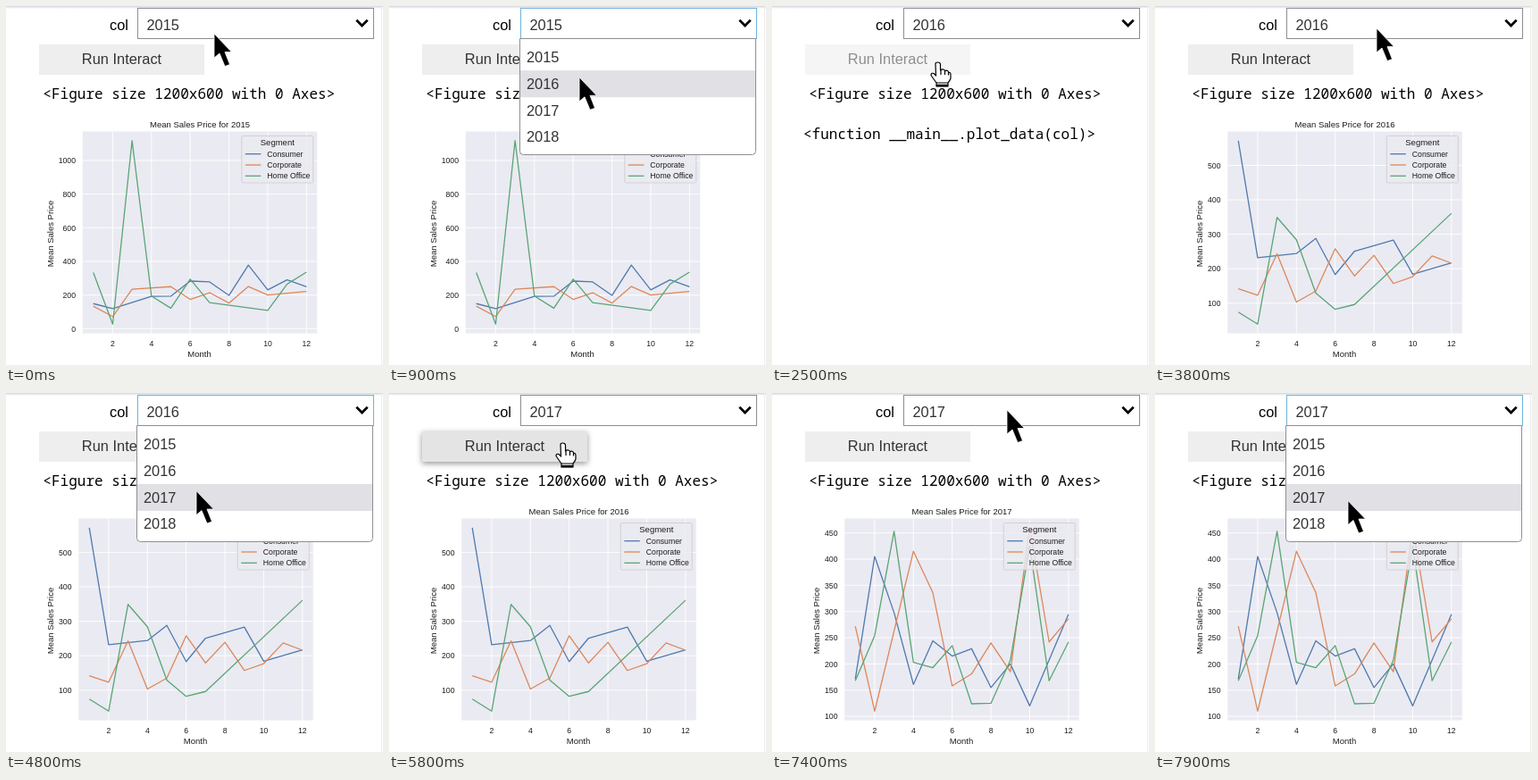
Write an HTML page that moves like this. It is 422 px wide and 402 px high and loops after 8000 ms.

```html
<!DOCTYPE html>
<html lang="en">
<head>
<meta charset="utf-8">
<title>Interactive sales plot</title>
<style>
html, body { margin: 0; width: 100%; height: 100%; overflow: hidden; background: #fff; }
svg { display: block; width: 422px; height: 402px; font-family: "Liberation Sans", Arial, sans-serif; }
.ui { font-size: 16.4px; fill: #333; }
.mono { font: 16.05px "Noto Sans Mono", monospace; fill: #000; white-space: pre; }
.big { font-size: 9.5px; fill: #1c1c1c; }
.small { font-size: 8.7px; fill: #1c1c1c; }
.mid { text-anchor: middle; }
.end { text-anchor: end; }
.line { fill: none; stroke-width: 1.3; stroke-linejoin: round; }
#btn rect { fill: #eee; }
#btn.hover rect { filter: drop-shadow(0 1.5px 1.5px rgba(0,0,0,.32)); }
#btn.active rect { fill: #e4e4e4; filter: drop-shadow(0 2px 3px rgba(0,0,0,.42)); }
#btn.disabled { opacity: .55; }
</style>
</head>
<body>
<svg viewBox="0 0 422 402">
  <defs>
    <linearGradient id="edge" x2="0" y2="1">
      <stop stop-color="#d6d2da"/><stop offset="1" stop-color="#fff"/>
    </linearGradient>
  </defs>
  <rect width="422" height="402" fill="#fff"/>
  <rect width="422" height="3" fill="url(#edge)"/>
  <path d="M420.5 0V402" stroke="#ececec"/>

  <text class="ui" x="116" y="27" style="fill:#000">col</text>
  <rect id="box" x="147.5" y="2.5" width="264" height="34" fill="#fff"/>
  <text class="ui" id="value" x="157.5" y="27"></text>
  <path d="M392.3 15.8L398.5 22L404.7 15.8" fill="none" stroke="#000" stroke-width="2.7"/>

  <g id="btn">
    <rect x="37" y="43" width="185" height="34"/>
    <text class="ui mid" x="129.5" y="65">Run Interact</text>
  </g>
  <text class="mono" x="41.3" y="104">&lt;Figure size 1200x600 with 0 Axes&gt;</text>
  <text class="mono" id="repr" x="35" y="149">&lt;function __main__.plot_data(col)&gt;</text>
  <g id="charts"></g>

  <g id="menu">
    <path d="M146.5 36.5H410.5V162.5Q410.5 166.5 406.5 166.5H150.5Q146.5 166.5 146.5 162.5Z" fill="#fff" stroke="#8f8f8f"/>
    <rect id="mark" x="147" width="263" height="30" fill="#e0e0e5"/>
  </g>

  <path id="arrow" d="M0 0V27L6 22L12 36.5L17.5 34.5L12 20.5H19.5Z" stroke="#fff" stroke-width=".8"/>
  <g id="hand" fill="#fff" stroke="#000" stroke-width="1.2" stroke-linejoin="round">
    <path d="M-4 2Q-4 0 -1.5 0Q1 0 1.5 2V9Q3 7.5 5 8Q6.5 8.5 6.5 10Q8 8.5 9.5 9.5Q10.5 10 10.5 11.5Q13 11 13 14V18Q12 21 10 23V27H-3V23Q-6 19 -9 14.5Q-9 11.5 -6 12.5L-3.5 15Z"/>
    <path d="M2 9V14M6.5 10V14M10.5 11.5V14.5M-3 23H10" fill="none"/>
    <path d="M-3 26H10" stroke-width="2.4"/>
  </g>
</svg>
<script>
const $ = id => document.getElementById(id);

function add(parent, tag, attrs, text) {
  const el = document.createElementNS('http://www.w3.org/2000/svg', tag);
  for (const k in attrs) el.setAttribute(k, attrs[k]);
  if (text !== undefined) el.textContent = text;
  return parent.appendChild(el);
}

const COLORS = { 'Consumer': '#4f7aae', 'Corporate': '#dc885a', 'Home Office': '#59a574' };

// Turning points of each line as month: price
const SALES = {
  2015: {
    'Consumer': { 1: 149, 2: 119, 4: 192, 5: 193, 6: 283, 7: 278, 8: 198, 9: 378, 10: 231, 11: 290, 12: 249 },
    'Corporate': { 1: 134, 2: 72, 3: 235, 5: 250, 6: 174, 7: 214, 8: 152, 9: 251, 10: 200, 12: 221 },
    'Home Office': { 1: 333, 2: 27, 3: 1118, 4: 194, 5: 122, 6: 294, 7: 155, 10: 108, 11: 265, 12: 336 }
  },
  2016: {
    'Consumer': { 1: 572, 2: 232, 4: 244, 5: 288, 6: 183, 7: 251, 9: 283, 10: 184, 12: 217 },
    'Corporate': { 1: 142, 2: 123, 3: 243, 4: 103, 5: 135, 6: 258, 7: 179, 8: 239, 9: 157, 10: 177, 11: 237, 12: 216 },
    'Home Office': { 1: 74, 2: 39, 3: 349, 4: 284, 5: 129, 6: 82, 7: 96, 12: 361 }
  },
  2017: {
    'Consumer': { 1: 171, 2: 405, 3: 298, 4: 161, 5: 244, 6: 215, 7: 229, 8: 155, 9: 200, 10: 120, 12: 295 },
    'Corporate': { 1: 272, 2: 110, 4: 415, 5: 336, 6: 158, 7: 181, 8: 240, 9: 185, 10: 460, 11: 242, 12: 286 },
    'Home Office': { 1: 168, 2: 254, 3: 453, 4: 203, 5: 193, 6: 235, 7: 124, 8: 125, 9: 207, 10: 425, 11: 168, 12: 242 }
  }
};

const AXES = { top: 140.5, width: 262.5, height: 226 };

// Limits, ticks and margins follow from the data, with 5% padding
function drawPlot(year) {
  const g = add($('charts'), 'g', {});
  const { top, width, height } = AXES, bottom = top + height;
  const prices = Object.values(SALES[year]).flatMap(Object.values);
  const min = Math.min(...prices), max = Math.max(...prices);
  const pad = (max - min) * .05, lo = min - pad, span = max - min + 2 * pad;
  const step = [50, 100, 200].find(s => span / s < 8);
  const left = 67.8 + 4.5 * String(max).length;
  const mid = left + width / 2;
  const px = month => left + width / 22 + width / 12.1 * (month - 1);
  const py = price => bottom - (price - lo) / span * height;
  const grid = d => add(g, 'path', { d, stroke: '#fff', 'stroke-width': .9 });

  add(g, 'rect', { x: left, y: top, width, height, fill: '#eaeaf2' });
  for (let m = 2; m <= 12; m += 2) {
    grid(`M${px(m)} ${top}v${height}`);
    add(g, 'text', { class: 'small mid', x: px(m), y: 381 }, m);
  }
  for (let v = Math.max(0, Math.ceil(lo / step) * step); v < lo + span; v += step) {
    grid(`M${left} ${py(v)}h${width}`);
    add(g, 'text', { class: 'small end', x: left - 7.8, y: py(v) + 3.2 }, v);
  }
  for (const name in COLORS) {
    const points = Object.entries(SALES[year][name]).map(([m, v]) => `${px(m)},${py(v)}`);
    add(g, 'polyline', { class: 'line', stroke: COLORS[name], points: points.join(' ') });
  }

  add(g, 'text', { class: 'big mid', x: mid, y: 136.3 }, `Mean Sales Price for ${year}`);
  add(g, 'text', { class: 'big mid', x: mid - .5, y: 393 }, 'Month');
  add(g, 'text', { class: 'big mid', transform: `translate(53.3 255) rotate(-90)` }, 'Mean Sales Price');

  add(g, 'rect', {
    x: left + 178, y: 145.5, width: 80, height: 52.5, rx: 1.5,
    fill: '#eaeaf2', 'fill-opacity': .8, stroke: '#ccc', 'stroke-width': .8
  });
  add(g, 'text', { class: 'big mid', x: left + 218, y: 156.3 }, 'Segment');
  Object.keys(COLORS).forEach((name, i) => {
    const y = 165.7 + i * 12.3;
    add(g, 'path', { class: 'line', d: `M${left + 182} ${y}h17.5`, stroke: COLORS[name] });
    add(g, 'text', { class: 'small', x: left + 206.5, y: y + 3 }, name);
  });
  return g;
}

const charts = {};
for (const year in SALES) charts[year] = drawPlot(year);
const optionY = year => 63 + (year - 2015) * 29.8;
for (let y = 2015; y <= 2018; y++) add($('menu'), 'text', { class: 'ui', x: 154, y: optionY(y) }, y);

// Every round does the same: open the menu, pick the next year, run, wait, go back
const LOOP = 8000, FIRST = 400, ROUND = 3600;
const AT = { pick: 500, choose: 1000, button: 1100, press: 1600, clear: 2000, done: 2400, leave: 3000 };

function pointer(p, i, old, year) {
  if (p < AT.pick) return ['arrow', 216, optionY(old) - 2];
  if (p < AT.button) return ['arrow', 213, optionY(year) - 13];
  if (p < AT.leave) return ['hand', 187 + 9 * i, 63 - 7 * i];
  return ['arrow', 248 + 15 * i, 25 - 6 * i];
}

function button(p) {
  if (p < AT.button || p >= AT.leave) return '';
  if (p < AT.press || p >= AT.done) return 'hover';
  return p < AT.clear ? 'active' : 'disabled';
}

const show = (id, on) => $(id).setAttribute('visibility', on ? 'visible' : 'hidden');

function render(t) {
  const i = Math.floor((t - FIRST) / ROUND), p = t - FIRST - i * ROUND;
  const year = 2016 + i, old = year - 1;
  const busy = p >= AT.clear && p < AT.done;
  const shown = p < AT.clear ? old : year;

  for (const y in charts) charts[y].setAttribute('visibility', !busy && +y === shown ? 'visible' : 'hidden');
  show('repr', busy);
  show('menu', p < AT.choose);
  $('mark').setAttribute('y', optionY(p < AT.pick ? old : year) - 20.6);
  $('value').textContent = p < AT.choose ? old : year;
  $('box').setAttribute('stroke', p < AT.press ? '#6db3dc' : '#8e8e8e');
  $('btn').setAttribute('class', button(p));

  const [kind, x, y] = pointer(p, i, old, year);
  show('arrow', kind === 'arrow');
  show('hand', kind === 'hand');
  $(kind).setAttribute('transform', `translate(${x} ${y})`);
}

const start = performance.now();
function tick() {
  render((performance.now() - start) % LOOP);
  requestAnimationFrame(tick);
}
tick();
</script>
</body>
</html>
```
